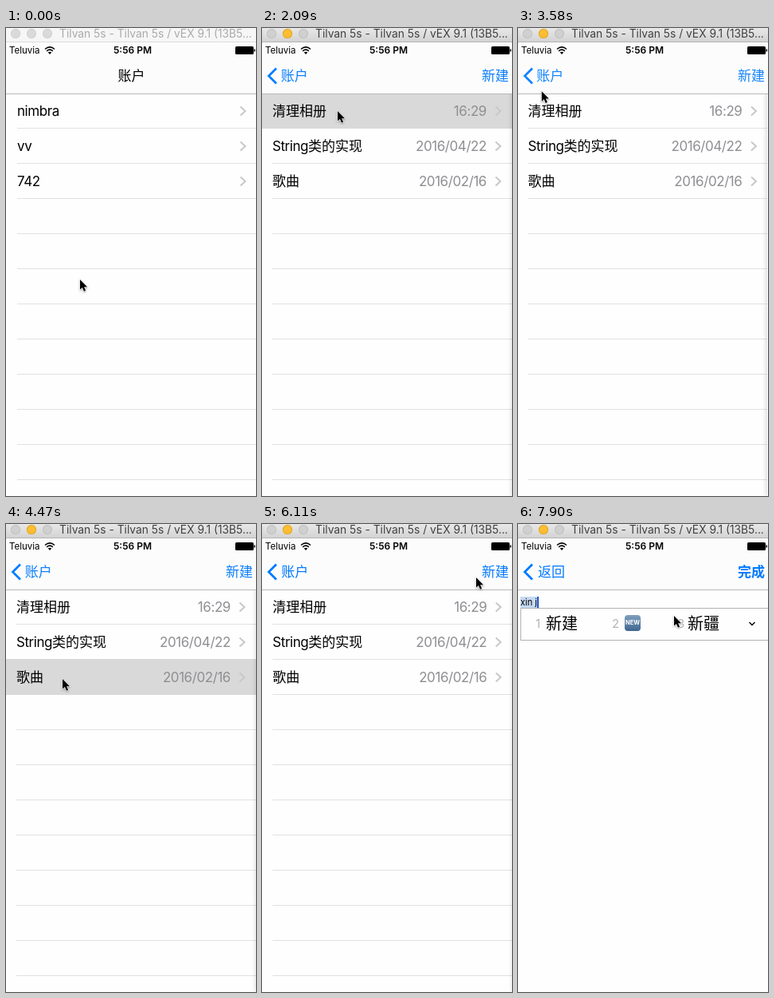
An HTML page for the animation above (8 s loop, 314 px wide and 586 px high).

```html
<!DOCTYPE html>
<html lang="zh-CN">
<head>
<meta charset="utf-8">
<title>Notes demo</title>
<style>
html, body { margin: 0; width: 100%; height: 100%; overflow: hidden; background: #fefefe; }
body { position: relative; font-family: Inter, "Noto Sans CJK SC", "Noto Sans CJK", sans-serif; color: #000; }
div, span, svg { position: absolute; }
span { white-space: pre; line-height: 20px; }
i { font-style: normal; }
.page i { letter-spacing: -.025em; }
.page .stamp i { letter-spacing: 0; }
.stamp { color: #777; font-weight: 600; }
.page { left: 0; top: 0; width: 320px; height: 586px; margin-left: -2px; box-sizing: border-box;
  border-left: 2px solid #fefefe; background: #fefefe; box-shadow: 0 0 7px #0004; }
.rows { left: 14px; right: 0; top: 82px; bottom: 0;
  background: repeating-linear-gradient(#0000 0 43px, #e1e1e3 43px 44px); }
.hit { left: -2px; right: 0; height: 45px; background: #d9d9d9; opacity: 0; }
#bar { z-index: 5; left: 0; top: 0; width: 100%; height: 82px; background: #fcfcfc; border-bottom: 1px solid #b8b8ba; }
.nav { inset: 0; }
.nav span { color: #007aff; }
#win { left: 0; top: 0; width: 100%; height: 17px; border-bottom: 1px solid #dcdcdc; background: #f6f6f6; color: #aaa; }
#win b { position: absolute; top: 1px; width: 12px; height: 12px; border-radius: 50%; background: #dadada; box-shadow: inset 0 0 0 1px #d0d0d0; }
#win.on { background: linear-gradient(#e8e8e8, #d3d3d3); border-color: #b4b4b4; color: #404040; }
#win.on b { background: #d0d0d0; box-shadow: inset 0 0 0 1px #c0c0c0; }
#win.on .min { background: #fdbe2f; box-shadow: inset 0 0 0 1px #e0a325; }
#typed { left: 3px; top: 91px; height: 14px; font-size: 11px; line-height: 14px; }
#typed u { text-decoration: none; background: #c5d9f3; display: inline-block; height: 14px; }
#typed s { position: absolute; left: 100%; top: 0; width: 2px; height: 14px; background: #2450d0; }
#ime { left: 3px; top: 105px; width: 320px; height: 39px; border: 1px solid #b2b2b2; background: #fefefe; }
#new { left: 130px; top: 8px; width: 20px; height: 20px; border-radius: 4px; background: linear-gradient(#7f9fbf, #41678f);
  color: #fff; font: bold 7.5px/20px Inter, sans-serif; text-align: center; }
#cursor { z-index: 9; left: 0; top: 0; overflow: visible; filter: drop-shadow(0 1px 1px #0005); }
</style>
</head>
<body>
<script>
const text = (x, y, s, size = 17, css = '', cls = '') =>
  `<span class="${cls}" style="left:${x}px;top:${y - 10}px;font-size:${size}px;${css}">${s.replace(/[ -~]+/g, '<i>$&</i>')}</span>`;
const svg = (x, y, w, h, body, attrs = '') =>
  `<svg ${attrs} style="left:${x}px;top:${y}px" width="${w}" height="${h}" fill="none">${body}</svg>`;
const line = (d, color, width) => `<path d="${d}" stroke="${color}" stroke-width="${width}"/>`;

const row = (i, label, date = '') => {
  const y = 104 + 44 * i;
  return text(14, y, label) + text(0, y, date, 17, 'left:auto;right:35px;color:#8e8e93') +
    svg(292, y - 8, 12, 16, line('M2.5 2.5 8.5 8 2.5 13.5', '#c7c7cc', 2));
};
const table = rows => '<div class="rows"></div><div class="hit"></div>' + rows.map((r, i) => row(i, ...r)).join('');
const note = (date, lines) => text(98, 103, date, 10.5, '', 'stamp') +
  lines.map((s, i) => text(3, 123.5 + 13.7 * i, s, 12)).join('');

const back = label => svg(5, 48, 16, 24, line('M13 2.5 3.5 12 13 21.5', '#007aff', 2.8)) + text(25, 60, label, 17, '', 'slide');
const pages = {
  home: [table([['nimbra'], ['vv'], ['742']]),
    text(140.5, 60, '账户', 17, 'color:#000;font-weight:500', 'slide')],
  list: [table([['清理相册', '16:29'], ['String类的实现', '2016/04/22'], ['歌曲', '2016/02/16']]),
    back('账户') + text(276, 60, '新建', 17, '', 'tap')],
  noteA: [note('2016/04/26 16:29', ['清理相册', '', '把不需要的相片删除，腾出手机内存空间。']),
    text(6, 60, '返回', 17, '', 'tap')],
  noteB: [note('2016/02/16 10:12', ['歌曲', '', '柳岸坡－禾屿', '霜满西桥－陶岑', '因梦成舟－江以澄']),
    text(6, 60, '返回', 17, '', 'tap')],
  edit: ['<span id="typed"><u></u><s></s></span><div id="ime"></div>',
    back('返回') + text(276, 60, '完成', 17, 'font-weight:600')]
};

const names = Object.keys(pages);
document.body.innerHTML =
  names.map(n => `<div class="page" id="${n}">${pages[n][0]}</div>`).join('') +
  '<div id="bar">' +
  names.map(n => `<div class="nav" id="nav-${n}">${pages[n][1]}</div>`).join('') +
  text(4, 28, 'Teluvia', 11.5) + text(135, 28, '5:56 PM', 12, 'font-weight:600') +
  svg(48, 22, 14, 12, line('M1 4.5Q7 -.8 13 4.5M3.2 6.8Q7 3.6 10.8 6.8', '#000', 1.6) + '<path d="M4.8 8.6Q7 6.9 9.2 8.6L7 11z" fill="#000"/>') +
  svg(288, 23, 26, 11, '<rect width="23" height="10" rx="1.5" fill="#000"/><path d="M23.5 3.5h1.5v3h-1.5z" fill="#000"/>') +
  '<div id="win">' + [6, 26, 46].map(x => `<b class="${x == 26 ? 'min' : ''}" style="left:${x}px"></b>`).join('') +
  text(67, 7, 'Tilvan 5s - Tilvan 5s / vEX 9.1 (13B5...', 13.8) + '</div></div>' +
  svg(0, 0, 14, 20, '<path d="M0 0V12.6L2.9 10 5 14.8 7.1 13.8 5.1 9.2H9.1Z" fill="#000" stroke="#fff" stroke-width="1.2" paint-order="stroke"/>', 'id="cursor"');

const $ = id => document.getElementById(id);
const clamp = v => Math.max(0, Math.min(1, v));

// The screen refreshes only at these ticks: first, last, count
const ticks = [[0, 0, 1], [300, 1340, 8], [1490, 1640, 2], [2090, 3130, 8], [3280, 4180, 7],
  [4470, 5510, 8], [5660, 6560, 7], [6710, 7300, 5], [7600, 7900, 3]]
  .flatMap(([a, b, n]) => Array.from({ length: n }, (_, i) => a + (b - a) * i / Math.max(1, n - 1)));

// start, from, to, direction (1 push, -1 pop), table row
const moves = [[1040, 'home', 'list', 1, 0], [2078, 'list', 'noteA', 1, 0], [3100, 'noteA', 'list', -1, 0],
  [4458, 'list', 'noteB', 1, 2], [5560, 'noteB', 'list', -1, 2], [6600, 'list', 'edit', 1, -9]];

const path = [[300, 93, 315], [900, 95, 104], [2390, 95, 104], [2830, 25, 66], [3430, 25, 66], [4180, 71, 194],
  [4920, 71, 194], [5510, 27, 54], [5660, 27, 54], [6110, 269, 67], [6410, 289, 59], [6710, 289, 59], [7300, 196, 115]];

const input = [['', []], ['x', ['想', '下', '小']], ['xin', ['新', '心', '信']], ['xin j', ['新建', 'NEW', '新疆']]];

function drawPages(t) {
  const [start, from, to, dir, hitRow] = moves.findLast(m => m[0] <= t) || [-9000, '', 'home', 1, -9];
  const dt = t - start, u = dt * .0127;
  const rest = dt > 600 ? 0 : (1 + u) * Math.exp(-u);
  const press = moves.find(m => m[0] > t && m[0] - t < 130 && (m[3] < 0 || m[2] == 'edit'));
  for (const n of names) {
    const page = $(n), nav = $('nav-' + n), isTo = n == to;
    const shown = isTo || n == from && rest > 0;
    page.style.display = nav.style.display = shown ? '' : 'none';
    if (!shown) continue;
    // depth: 1 is off to the right, -1 is fully behind
    const depth = isTo ? dir * rest : -dir * (1 - rest);
    page.style.transform = `translateX(${depth * (depth < 0 ? 96 : 320)}px)`;
    page.style.zIndex = depth < 0 ? 1 : 2;
    page.style.filter = depth < 0 ? `brightness(${1 + .1 * depth})` : '';
    nav.style.opacity = isTo ? clamp((dt - 250) / 250) : clamp(1 - dt / 330);
    nav.querySelectorAll('.slide').forEach(e => e.style.transform = `translateX(${116 * depth}px)`);
    nav.querySelectorAll('.tap').forEach(e => e.style.opacity = press && press[1] == n ? .2 : 1);
    const hit = page.querySelector('.hit');
    if (hit) {
      hit.style.top = 81 + 44 * hitRow + 'px';
      hit.style.opacity = !isTo ? 1 : dir < 0 ? clamp(1 - dt / 350) : 0;
    }
  }
}

function drawCursor(t) {
  const i = path.findIndex(p => p[0] > t);
  const b = path[i < 0 ? path.length - 1 : i], a = i > 0 ? path[i - 1] : b;
  const k = a == b ? 0 : (t - a[0]) / (b[0] - a[0]), e = k * k * (3 - 2 * k);
  $('cursor').style.transform = `translate(${a[1] + (b[1] - a[1]) * e}px,${a[2] + (b[2] - a[2]) * e}px)`;
}

let typed = -1;
function drawInput(t) {
  const n = t < 7600 ? 0 : t < 7750 ? 1 : t < 7900 ? 2 : 3;
  if (n == typed) return;
  typed = n;
  const [str, words] = input[n];
  $('typed').firstChild.innerHTML = str;
  $('ime').style.display = n ? '' : 'none';
  $('ime').innerHTML = words.map((w, i) => {
    const x = [18, 114, 196][i];
    return text(x, 19, `${i + 1}`, 15, 'color:#b4b4b4') +
      (w == 'NEW' ? '<div id="new">NEW</div>' : text([31, 130, 209][i], 18.5, w, 20));
  }).join('') + svg(285, 15, 10, 8, line('M1.5 2 5 5.5 8.5 2', '#000', 1.4));
}

function frame() {
  const now = performance.now() % 8000;
  const t = ticks.findLast(k => k <= now + .01);
  $('win').className = t >= 890 ? 'on' : '';
  drawPages(t);
  drawCursor(t);
  drawInput(t);
  requestAnimationFrame(frame);
}
frame();
</script>
</body>
</html>
```
